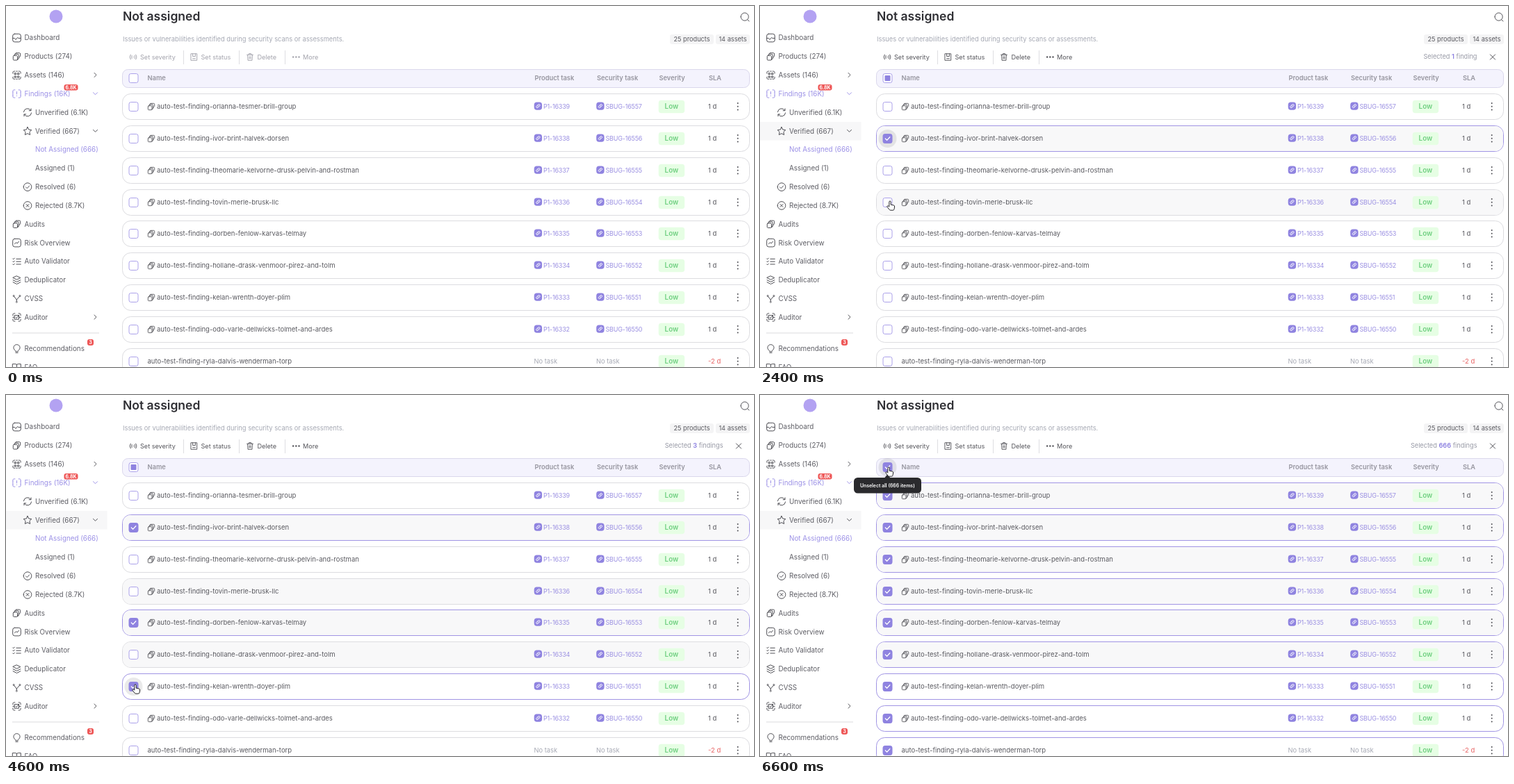
These frames come from a looping animation (1076 px wide and 520 px high, 8 s). An HTML page:

```html
<!DOCTYPE html>
<html lang="en">
<head>
<meta charset="utf-8">
<title>Not assigned</title>
<style>
html, body { margin: 0; width: 100%; height: 100%; overflow: hidden; background: #fff; }
svg { display: block; width: 1076px; height: 520px; font: 9.5px Inter, "Open Sans", sans-serif; fill: #5a5a60; color: #4e4e54; }
.nav { font-size: 9.85px; fill: #5e5e65; }
.title { font-size: 17.5px; font-weight: 600; fill: #2f2f34; }
.sub { font-size: 9.3px; fill: #a6a9b4; }
.chip { font-size: 9.2px; text-anchor: middle; }
.head { font-size: 9.3px; font-weight: 600; fill: #96959f; }
.task { font-size: 9px; letter-spacing: -.2px; fill: #9b90e2; }
.low { font-size: 9.8px; font-weight: 600; fill: #6fcf80; text-anchor: middle; }
.count { font-size: 9.2px; fill: #989aa6; text-anchor: end; }
.count tspan { fill: #8a7ee0; font-weight: 600; }
.badge { font-size: 7px; font-weight: 700; fill: #fff; text-anchor: middle; }
.tip { font-size: 6.9px; font-weight: 600; fill: #fff; text-anchor: middle; }
.tools { font-size: 9.1px; fill: currentColor; color: #a3a3ac; }
.tools.on { color: #55555b; }
.line { fill: none; stroke: currentColor; stroke-width: 1; stroke-linecap: round; stroke-linejoin: round; }
.violet { color: #9b90e6; fill: #9b90e6; }
.card { fill: #fff; stroke: #dcdce0; }
.on > .card { stroke: #a094e4; }
.box { fill: #fff; stroke: #aba1ea; }
.tick { fill: none; stroke: #fff; stroke-width: 1.3; stroke-linecap: round; stroke-linejoin: round; visibility: hidden; }
.dash { fill: #8f83e0; visibility: hidden; }
.on > .check .box { fill: #8f83e0; stroke: #8f83e0; }
.on > .check .tick, .mixed > .check .dash { visibility: visible; }
.tint, .halo, .hidden { visibility: hidden; }
.show { visibility: visible; }
.tint { fill: #f8f8f9; }
.halo { fill: rgba(60,60,66,.11); }
</style>
</head>
<body>
<svg id="stage" viewBox="0 0 1076 520"></svg>
<script>
const LOOP = 8000, STEP = 100, PITCH = 45.9;
const stage = document.getElementById('stage');

const square = 'M-3-5.8h6a2.8 2.8 0 0 1 2.8 2.8v6a2.8 2.8 0 0 1-2.8 2.8h-6a2.8 2.8 0 0 1-2.8-2.8v-6a2.8 2.8 0 0 1 2.8-2.8z';
const ring = 'M-5.8 0a5.8 5.8 0 1 0 11.6 0a5.8 5.8 0 1 0-11.6 0';
const stack = 'M-1.2-5.2h5q1.4 0 1.4 1.4v3.2l-2.4 2.4M-3-3.4h4.4q1.4 0 1.4 1.4v4.6l-1.8 1.8M-4 -1.4h3.8q1.2 0 1.2 1.2v4.2q0 1.2-1.2 1.2h-3.8q-1.2 0-1.2-1.2v-4.2q0-1.2 1.2-1.2zM-4 -1.6l3-3.4M1 4.8l1.8-2';
const corners = 'M-5.6-2.6v-1.4q0-1.6 1.6-1.6h1.4M2.6-5.6h1.4q1.6 0 1.6 1.6v1.4M5.6 2.6v1.4q0 1.6-1.6 1.6h-1.4M-2.6 5.6h-1.4q-1.6 0-1.6-1.6v-1.4';
const icons = {
  board: square + 'M-5.6.4h2.4l1.8 2 2.4-3 1.4 1h3',
  stack,
  grid: corners + 'M-3-3h2v2h-2zM1.4-3h2v2h-2zM-3 1.4h2v2h-2zM1.4 1.4h2v2h-2zM-.8-5.6h1.6M-.8 5.6h1.6',
  alert: corners + 'M-5.6-2.6v5.2M5.6-2.6v5.2M0-3v3.4M0 2.8v.2',
  cycle: 'M-5.6-.6a5.6 5.6 0 0 1 10.4-2.2M5-5.4v2.8h-2.8M5.6.6a5.6 5.6 0 0 1-10.4 2.2M-5 5.4v-2.8h2.8',
  star: 'M0-5.8l1.8 3.7 4 .6-2.9 2.8.7 4.1-3.6-1.9-3.6 1.9.7-4.1-2.9-2.8 4-.6z',
  done: ring + 'M-2.5.2l1.8 1.8 3.3-3.6',
  cross: ring + 'M-2-2l4 4M2-2l-4 4',
  trend: square + 'M-3 1.6l2-2.2 1.6 1.4 2.4-2.8',
  list: 'M-5.8-4l1 1 1.6-1.8M-5.8 0l1 1 1.6-1.8M-5.8 4l1 1 1.6-1.8M-.6-3.6h6.4M-.6.2h6.4M-.6 4h6.4',
  layers: 'M0-5.8l5.4 2.6-5.4 2.6-5.4-2.6zM-5.4 0l5.4 2.6 5.4-2.6M-5.4 3l5.4 2.8 5.4-2.8',
  branch: 'M-4.4-5a1 1 0 1 0 .1 0M4.4-5a1 1 0 1 0 .1 0M-3.6-3l3.4 4.6 3.8-4.6M-.2 1.6v2M-.2 3.6a1 1 0 1 0 .1 0',
  audit: corners + 'M-3-2.8h6v5.6h-6zM-1.6 0l1.2 1.2 3.8-4.6M-5.6 0h2M3.6 0h2',
  bulb: 'M-1.8 3.4c0-1.6-2.8-2.4-2.8-5a4.6 4.6 0 0 1 9.2 0c0 2.6-2.8 3.4-2.8 5zM-1.6 5.6h3.2',
  book: 'M-5.8-5h4q1.8 0 1.8 1.6 0-1.6 1.8-1.6h4v9h-4q-1.8 0-1.8 1.4 0-1.4-1.8-1.4h-4zM0-3.4v8',
  signal: 'M-3.8-3.4q-2.4 3.4 0 6.8M3.8-3.4q2.4 3.4 0 6.8M-2-2q-1.4 2 0 4M2-2q1.4 2 0 4M0-.3v.6',
  save: 'M-4.4-5h8.8v10h-8.8zM-2-5v4h4v-4M-2 2.4h4',
  trash: 'M-4.6-3.4h9.2M-3.6-3.4l.5 8.4h6.2l.5-8.4M-1.6-3.4v-1.8h3.2v1.8M-1-.8v3.4M1-.8v3.4',
  right: 'M-1.6-3.2l3.2 3.2-3.2 3.2',
  down: 'M-3.2-1.6l3.2 3.2 3.2-3.2',
  close: 'M-3.6-3.6l7.2 7.2M3.6-3.6l-7.2 7.2',
  link: 'M-.4-1.6l.8-.8a1.5 1.5 0 0 1 2.1 2.1l-1.2 1.2a1.5 1.5 0 0 1-2.1 0M.4 1.6l-.8.8a1.5 1.5 0 0 1-2.1-2.1l1.2-1.2a1.5 1.5 0 0 1 2.1 0'
};

const text = (x, y, s, cls = '') => `<text x="${x}" y="${y}" class="${cls}">${s}</text>`;
const rect = (x, y, w, h, r, attrs) => `<rect x="${x}" y="${y}" width="${w}" height="${h}" rx="${r}" ${attrs}/>`;
const icon = (name, x, y, k = 1) => `<path class="line" d="${icons[name]}" transform="translate(${x} ${y}) scale(${k})"/>`;
const dots = (x, y, dx, dy, r) => [-1, 0, 1].map(n =>
  `<circle cx="${x + n * dx}" cy="${y + n * dy}" r="${r}" fill="currentColor"/>`).join('');
const check = y => `<circle class="halo" cx="183.5" cy="${y}" r="13"/><g class="check">` +
  rect(177, y - 6.5, 13, 13, 2.6, 'class="box"') + rect(179.5, y - 4, 8, 8, 1, 'class="dash"') +
  `<path class="tick" d="M180.3 ${y}l2.3 2.4 4.2-4.6"/></g>`;

// level 0: main entry, 1: child with icon, 2: grandchild
const menu = [
  ['Dashboard', 'board', 0], ['Products (274)', 'stack', 0], ['Assets (146)', 'grid', 0, 'right'],
  ['Findings (16K)', 'alert', 0, 'down'], ['Unverified (6.1K)', 'cycle', 1], ['Verified (667)', 'star', 1, 'down'],
  ['Not Assigned (666)', '', 2], ['Assigned (1)', '', 2], ['Resolved (6)', 'done', 1], ['Rejected (8.7K)', 'cross', 1],
  ['Audits', 'stack', 0], ['Risk Overview', 'trend', 0], ['Auto Validator', 'list', 0], ['Deduplicator', 'layers', 0],
  ['CVSS', 'branch', 0], ['Auditor', 'audit', 0, 'right'], ['Recommendations', 'bulb', 0], ['FAQ', 'book', 0]
];

function sidebar() {
  const items = menu.map(([label, name, level, arrow], i) => {
    const y = 46 + i * 26.83 + (i > 15 ? 18.6 : 0);
    const violet = i === 3 || i === 6 ? 'violet' : '';
    return `<g class="nav ${violet}">` + (name ? icon(name, level ? 31 : 15.5, y) : '') +
      text(level ? 42 : 26.5, y + 3.4, label) + (arrow ? icon(arrow, 128.5, y - .3, .95) : '') + '</g>';
  });
  return rect(0, 167, 145.5, 26.5, 0, 'id="hover" class="hidden" fill="#f7f7f8"') +
    '<circle cx="72" cy="15" r="9.5" fill="#b3a2f2"/>' + items.join('') +
    '<path d="M9 471h125" stroke="#dadade"/>' +
    rect(83.5, 113, 20, 8.6, 3, 'fill="#ee5555"') + text(93.5, 119.9, '6.8K', 'badge') +
    rect(117, 480, 9, 9, 3, 'fill="#ee5555"') + text(121.5, 487.1, '3', 'badge');
}

function header() {
  return text(168, 21, 'Not assigned', 'title') +
    text(168, 51, 'Issues or vulnerabilities identified during security scans or assessments.', 'sub') +
    '<path class="line" d="M1057 15.5a5.6 5.6 0 1 0 11.2 0a5.6 5.6 0 1 0-11.2 0M1066.6 19.6l2.4 2.4"/>' +
    rect(955, 41, 63, 14, 3, 'fill="#f4f4f5"') + text(986.5, 51.2, '25 products', 'chip') +
    rect(1021, 41, 49, 14, 3, 'fill="#f4f4f5"') + text(1045.5, 51.2, '14 assets', 'chip') +
    '<g id="tools" class="tools">' +
    icon('signal', 183, 73.5) + text(193, 76.7, 'Set severity') +
    icon('save', 270.5, 73.5, .95) + text(280.5, 76.7, 'Set status') +
    icon('trash', 351, 73.5, .95) + text(361.5, 76.7, 'Delete') +
    dots(417.3, 73.5, 4.2, 0, 1.2) + text(427, 76.7, 'More') + '</g>' +
    '<path d="M255.5 64v20M335.5 64v20M401.5 64v20" stroke="#dedee2"/>' +
    `<g id="picked" class="hidden"><text id="count" class="count" x="1031.5" y="76.4"></text>${icon('close', 1054, 73.5)}</g>` +
    '<g id="all">' + rect(167.5, 91.5, 902, 26, 8, 'fill="#f4f3fd" stroke="#dad7ec"') + check(104) +
    [[203.5, 'Name'], [760.5, 'Product task'], [850, 'Security task'], [939.5, 'Severity'], [1011, 'SLA']]
      .map(([x, s]) => text(x, 107.4, s, 'head')).join('') + '</g>';
}

const names = [
  'orlanna-tesmer-brill-group', 'ivor-brint-halvek-dorsen', 'theomarie-kelvorne-drusk-pelvin-and-rostman',
  'tovin-merle-brusk-llc', 'dorben-fenlow-karvas-telmay', 'hollane-drask-venmoor-pirez-and-tolm',
  'kelan-wrenth-doyer-plim', 'odo-varle-dellwicks-tolmet-and-ardes', 'ryla-dalvis-wenderman-torp'
];

function task(x, y, label) {
  return rect(x, y - 6.6, 11.4, 11.4, 4, 'fill="#8f83e0"') +
    `<g color="#fff">${icon('link', x + 5.7, y - .9, .95)}</g>` + text(x + 13.3, y + 3.1, label, 'task');
}

function row(name, i) {
  const y = Math.round(144.8 + i * PITCH), last = i === 8, top = y - 18.5;
  const tasks = last
    ? text(759.5, y + 3.3, 'No task', 'sub') + text(849, y + 3.3, 'No task', 'sub')
    : task(759.7, y, 'P1-' + (16339 - i)) + task(849.2, y, 'SBUG-' + (16557 - i));
  return '<g class="row">' + rect(167.5, top, 902, 37, 12, 'class="card"') +
    rect(168, top + .5, 901, 36, 11.5, 'class="tint"') + check(y) +
    (last ? '' : icon('stack', 209, y, .9)) +
    text(last ? 203.5 : 217, y + 3.2, 'auto-test-finding-' + name) + tasks +
    rect(938.7, y - 9.3, 37.5, 18.6, 4, 'fill="#e6fee4"') + text(957.4, y + 3.4, 'Low', 'low') +
    `<text x="1010" y="${y + 3.3}" ${last ? 'fill="#e86464"' : ''}>${last ? '-2 d' : '1 d'}</text>` +
    dots(1052.7, y - .3, 0, 4.7, 1) + '</g>';
}

const hand = 'M-1.2 1.2a1.2 1.2 0 0 1 2.4 0v4l4 .8q1.6.4 1.4 2l-.6 3.6q-.2 1.6-1.8 1.6h-3.4q-1 0-1.6-.8l-3.2-4q-.6-.9.2-1.4t1.6.2l1 1z';
stage.innerHTML = sidebar() + header() + names.map(row).join('') +
  '<g id="tip">' + rect(139, 119, 88, 22.5, 5.5, 'id="tipBox" fill="#2a2a2d"') +
  '<path d="M179 119.5l4.3-5 4.3 5z" fill="#2a2a2d"/><text id="tipText" class="tip" x="183.3" y="132.6"></text></g>' +
  `<path id="hand" d="${hand}" fill="#fff" stroke="#26262a" stroke-linejoin="round"/>`;

const $ = id => document.getElementById(id);
const rows = [...stage.querySelectorAll('.row')].map(el => ({
  el, tint: el.querySelector('.tint'), halo: el.querySelector('.halo')
}));
const headHalo = $('all').querySelector('.halo');

// time, then fingertip position
const path = [
  [100, 1006, 85], [200, 690, 236], [300, 400, 293], [400, 227, 287], [600, 227, 287],
  [700, 247, 256], [800, 256, 228], [900, 264, 200], [1000, 264, 200], [1100, 228, 196],
  [1200, 202, 188], [1300, 187, 184], [1700, 186, 184], [1800, 140, 178], [1900, 80, 174],
  [2000, 42, 174], [2100, 110, 190], [2200, 196, 216], [2300, 202, 252], [2400, 187, 281],
  [2700, 183, 333], [2800, 183, 333], [3000, 182, 331], [3300, 182, 332], [3600, 180, 376],
  [3700, 181, 379], [3800, 181, 379], [4100, 187, 405], [4400, 186, 417], [4700, 186, 417],
  [4900, 215, 350], [5000, 238, 292], [5100, 205, 252], [5400, 205, 140], [5500, 235, 165],
  [5600, 210, 145], [5800, 185, 104]
];
const checkAt = [6400, 1600, 6400, 6400, 3200, 6400, 4600, 6400, 6400];
const tintAt = [5600, 1200, 5200, 400, 2600, 3700];
const halos = { 1: [1400, 3200], 4: [2600, 4600], 6: [4200, 6400] };

function pointer(t) {
  const n = path.findIndex(p => p[0] > t);
  if (n < 0) return path[path.length - 1].slice(1);
  const [t0, x0, y0] = path[n - 1], [t1, x1, y1] = path[n];
  const k = (t - t0) / (t1 - t0);
  return [x0 + (x1 - x0) * k, y0 + (y1 - y0) * k];
}

function render(t) {
  const all = t >= 6400, picked = t >= 1600;
  rows.forEach(({ el, tint, halo }, i) => {
    const [from, to] = halos[i] || [LOOP, LOOP];
    el.classList.toggle('on', t >= checkAt[i]);
    tint.classList.toggle('show', t >= tintAt[i]);
    halo.classList.toggle('show', t >= from && t < to);
  });
  $('all').setAttribute('class', all ? 'on' : picked ? 'mixed' : '');
  headHalo.classList.toggle('show', t >= 5800);
  $('tools').classList.toggle('on', picked);
  $('picked').classList.toggle('show', picked);
  $('hover').classList.toggle('show', t >= 1900);

  const n = all ? 666 : checkAt.filter(at => at <= t).length;
  $('count').innerHTML = `Selected <tspan>${n}</tspan> finding${n === 1 ? '' : 's'}`;

  $('tip').style.opacity = Math.min(1, Math.max(0, (t - 5800) / 200));
  $('tipBox').setAttribute('x', all ? 135 : 139);
  $('tipBox').setAttribute('width', all ? 97 : 88);
  $('tipText').textContent = `${all ? 'Unselect' : 'Select'} all (666 items)`;

  $('hand').style.display = t < 100 ? 'none' : '';
  if (t >= 100) $('hand').setAttribute('transform', `translate(${pointer(t)})`);
}

const start = performance.now();
let shown = -1;
function tick() {
  const t = Math.floor((performance.now() - start) % LOOP / STEP) * STEP;
  if (t !== shown) render(shown = t);
  requestAnimationFrame(tick);
}
tick();
</script>
</body>
</html>
```
